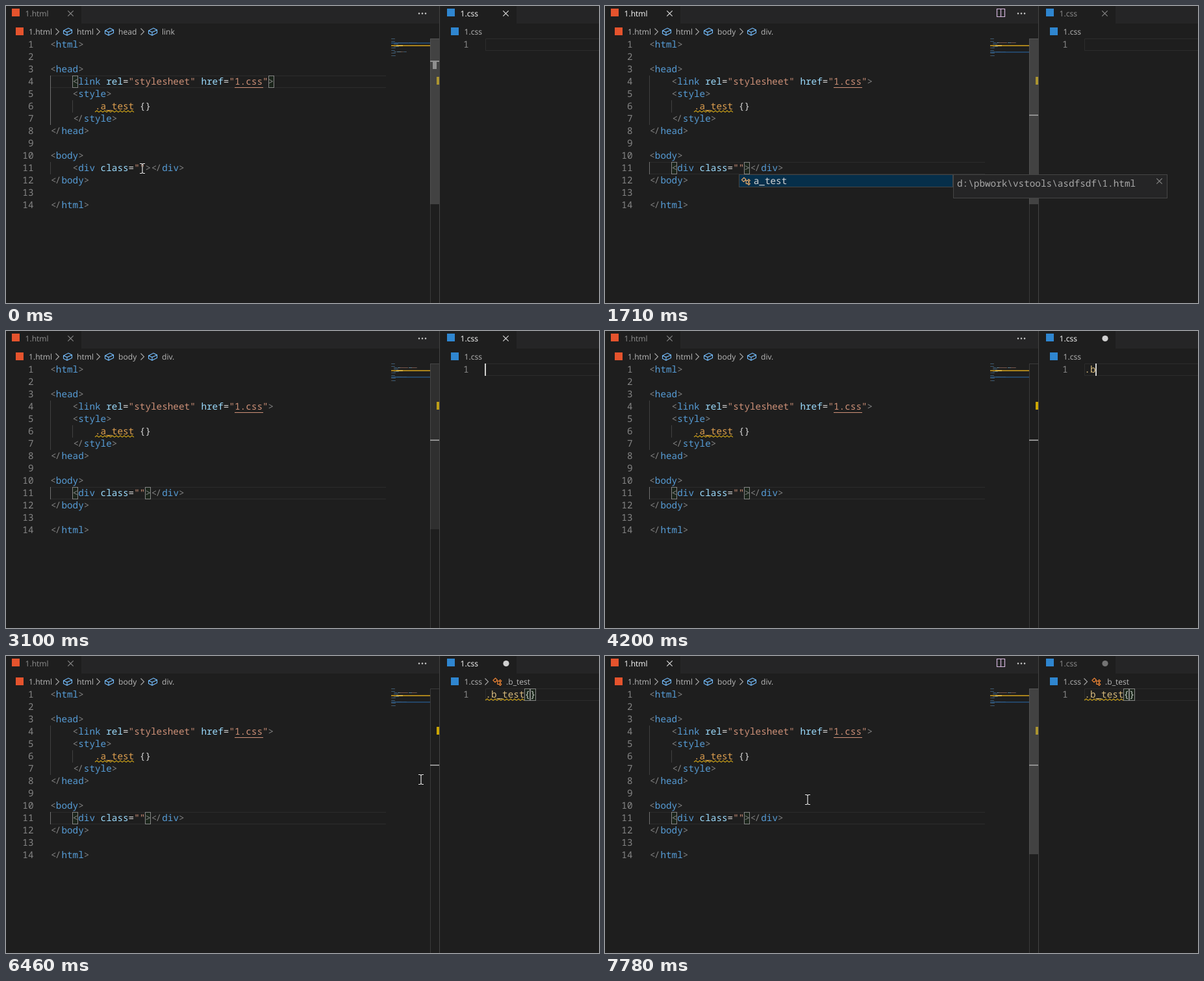
An HTML page that plays this animation: 913 by 457 pixels, repeating every 8000 ms.

```html
<!DOCTYPE html>
<html lang="en">
<head>
<meta charset="utf-8">
<title>Editor demo</title>
<style>
html, body { margin: 0; width: 100%; height: 100%; overflow: hidden; background: #1e1e1e; }
svg { display: block; width: 913px; height: 457px; }
text { text-rendering: geometricPrecision; white-space: pre; }
.code { font: 500 14.33px "Noto Sans Mono", "DejaVu Sans Mono", monospace; }
.ui { font: 12.1px "Open Sans", "Noto Sans", sans-serif; fill: #b8b8b8; }
.bar { fill: #252526; }
.num { fill: #858585; text-anchor: end; }
.line { fill: none; stroke: #2c2c2c; }
.match { fill: rgba(0, 100, 0, .1); stroke: #858585; }
.guide { fill: #404040; }
.active { fill: #707070; }
.caret { fill: #d0d0ce; }
.wave { fill: none; stroke: #d0a416; stroke-width: 1.1; }
.chev { fill: none; stroke: #a9a9a9; stroke-width: 1.1; }
.cube { fill: none; stroke: #75beff; stroke-width: 1.1; }
.node { fill: none; stroke: #ee8434; stroke-width: 1.2; }
.html { fill: #e5532d; }
.css { fill: #2f86d0; }
.warn { fill: #cca700; }
.ltab, .rtab { fill: #8f8f8f; }
.x { fill: none; stroke: #8a8a8a; stroke-width: 1.1; }
.left .ltab, .right .rtab { fill: #fff; }
.left .lx, .right .rx { stroke: #e0e0e0; }
.left .dot { fill: #747474; }
.right .dot { fill: #d0d0d0; }
</style>
</head>
<body>
<svg id="stage" viewBox="0 0 913 457">
  <defs>
    <path id="cross" d="M-4.2-4.2 4.2 4.2M4.2-4.2-4.2 4.2"/>
    <path id="chev" d="M-2.5-5 2.5 0-2.5 5"/>
    <path id="cube" d="M-6.5-1.6 1-5.5 6.5-2.6V1.9L-1 5.6-6.5 2.9ZM-6.5-1.6-1 .8 6.5-2.6M-1 .8V5.6"/>
    <path id="node" d="M-6.5-1.5-3-5 0-2-3.5 1.5ZM-1.5-.5H2.6M.3-.5V4.5H2.6M2.6-.5 4.4-2.3 6.2-.5 4.4 1.3ZM2.6 4.5 4.4 2.7 6.2 4.5 4.4 6.3Z"/>
    <path id="beam" d="M-4-7.5H-1.5L0-6.5 1.5-7.5H4M0-6.5V6.5M-4 7.5H-1.5L0 6.5 1.5 7.5H4"/>
  </defs>
  <rect width="913" height="457" fill="#1e1e1e"/>

  <!-- tab bars -->
  <rect class="bar" x="116" width="551" height="27"/>
  <rect class="bar" x="786" width="127" height="27"/>
  <rect class="html" x="9" y="4" width="12" height="12"/>
  <text class="ui ltab" x="29.5" y="16">1.html</text>
  <use class="x lx" href="#cross" x="99.5" y="11.5"/>
  <path d="M603.5 4.5H615.5V16.5H603.5ZM609.5 4.5V16.5" fill="none" stroke="#d3b5dc" stroke-width="1.2"
    data-on="150-3100 7230-8000"/>
  <g fill="#cfcfcf">
    <circle cx="636" cy="11.5" r="1.2"/><circle cx="641" cy="11.5" r="1.2"/><circle cx="646" cy="11.5" r="1.2"/>
  </g>
  <rect class="css" x="679" y="4" width="12" height="12"/>
  <text class="ui rtab" x="699.5" y="16">1.css</text>
  <use class="x rx" href="#cross" x="769.5" y="11.5" data-on="0-3970"/>
  <circle class="dot" cx="770" cy="11.5" r="4.6" data-on="3970-8000"/>

  <!-- breadcrumbs -->
  <rect class="html" x="15" y="33" width="12" height="12"/>
  <text class="ui" x="35" y="44">1.html</text>
  <use class="chev" href="#chev" x="79" y="39.5"/>
  <use class="cube" href="#cube" x="95" y="39.5"/>
  <text class="ui" x="109" y="44">html</text>
  <use class="chev" href="#chev" x="142" y="39.5"/>
  <use class="cube" href="#cube" x="159" y="39.5"/>
  <use class="chev" href="#chev" x="210" y="39.5"/>
  <use class="cube" href="#cube" x="226" y="39.5"/>
  <g class="ui" data-on="0-230"><text x="173" y="44">head</text><text x="240" y="44">link</text></g>
  <g class="ui" data-on="230-8000"><text x="173" y="44">body</text><text x="240" y="44">div.</text></g>
  <rect class="css" x="685" y="33" width="12" height="12"/>
  <text class="ui" x="705.5" y="44">1.css</text>
  <g data-on="4580-8000">
    <use class="chev" href="#chev" x="740" y="39.5"/>
    <use class="node" href="#node" x="756.5" y="39"/>
    <text class="ui" x="770" y="44" id="crumb"></text>
  </g>

  <!-- current lines and guides -->
  <rect class="guide" x="68" y="107" width="1" height="76"/>
  <rect class="guide" x="102" y="145" width="1" height="19"/>
  <rect class="guide" x="68" y="240" width="1" height="19"/>
  <g data-on="0-150">
    <path class="line" d="M68 107.5H585M68 125.5H585"/>
    <rect class="guide active" x="68" y="107" width="1" height="76"/>
    <rect class="match" x="102.5" y="107.5" width="8" height="18"/>
    <rect class="match" x="404.5" y="107.5" width="8" height="18"/>
  </g>
  <g data-on="150-8000">
    <path class="line" d="M68 240.5H585M68 258.5H585"/>
    <rect class="guide active" x="68" y="240" width="1" height="19"/>
    <rect class="match" x="102.5" y="240.5" width="8" height="18"/>
    <rect class="match" x="214.5" y="240.5" width="8" height="18"/>
  </g>
  <path class="line" d="M913 50.5H738.5V68.5H913"/>

  <!-- code -->
  <g id="code" class="code"></g>
  <path d="M352 125.5H396" stroke="#ce9178"/>
  <g id="waves"></g>
  <g class="code">
    <text class="num" x="712.5" y="64">1</text>
    <text x="738.3" y="64"><tspan id="rule" fill="#d7ba7d"></tspan><tspan id="braces" fill="#d4d4d4"></tspan></text>
  </g>
  <g data-on="5590-8000">
    <rect class="match" x="798.5" y="50.5" width="8" height="18"/>
    <rect class="match" x="807.5" y="50.5" width="8" height="18"/>
  </g>
  <rect class="caret" x="205" y="240" width="2" height="19"
    data-on="150-690 1160-1710 2180-2650 7230-7780"/>
  <rect class="caret" id="caret" y="50" width="2" height="19"
    data-on="3100-3650 3970-6140 6610-7080"/>

  <!-- minimap and overview ruler -->
  <g id="map" opacity=".5"></g>
  <rect x="593" y="56" width="60" height="2" fill="#264f78" opacity=".8" data-on="0-150"/>
  <rect x="593" y="70" width="60" height="2" fill="#264f78" opacity=".8" data-on="150-8000"/>
  <rect x="593" y="60" width="60" height="2" fill="#a9821c"/>
  <rect x="601" y="60" width="10" height="2" fill="#d6ae3c"/>
  <path d="M653.5 50V457M653 50.5H667" stroke="#3a3a3a"/>
  <rect class="warn" x="663" y="109" width="4" height="12"/>
  <rect id="slider" x="653" y="50" width="14" height="255" fill="#797979" fill-opacity=".4"/>
  <g fill="#8f8f8f">
    <path d="M653 84H667V86H663V97H657V86H653Z" data-on="0-150"/>
    <rect x="653" y="167" width="14" height="2" data-on="150-8000"/>
  </g>
  <path d="M667.5 0V457" stroke="#444"/>

  <!-- suggestion list -->
  <g data-on="1480-3100">
    <rect x="206.5" y="259.5" width="329" height="19" fill="#062f4a" stroke="#454545"/>
    <use class="node" href="#node" x="217" y="269" style="stroke:#e8ab6a"/>
    <text class="code" x="228.7" y="274" fill="#d4d4d4">a_test</text>
    <rect x="536.5" y="259.5" width="329" height="36" fill="#252526" stroke="#454545"/>
    <text class="code" x="542" y="278" fill="#a8a8a8">d:\pbwork\vstools\asdfsdf\1.html</text>
    <use class="x" href="#cross" x="853.5" y="269.5"/>
  </g>

  <g id="mouse" fill="none" data-on="0-1480 6460-8000">
    <use href="#beam" stroke="#111" stroke-width="2.6"/>
    <use href="#beam" stroke="#f0f0f0" stroke-width="1.2"/>
  </g>
</svg>
<script>
const LOOP = 8000, CHAR = 8.6, LINE = 19;
const $ = id => document.getElementById(id);

// Each token starts with its colour key; the number is the indent.
const colors = { g: '#808080', t: '#569cd6', a: '#9cdcfe', s: '#ce9178', c: '#dfa050', w: '#d4d4d4' };
const lines = [
  [0, 'g<~thtml~g>'],
  [0, ''],
  [0, 'g<~thead~g>'],
  [4, 'g<~tlink~w ~arel~w=~s"stylesheet"~w ~ahref~w=~s"1.css"~g>'],
  [4, 'g<~tstyle~g>'],
  [8, 'c.a_test~w {}'],
  [4, 'g</~tstyle~g>'],
  [0, 'g</~thead~g>'],
  [0, ''],
  [0, 'g<~tbody~g>'],
  [4, 'g<~tdiv~w ~aclass~w=~s""~g>~g</~tdiv~g>'],
  [0, 'g</~tbody~g>'],
  [0, ''],
  [0, 'g</~thtml~g>']
];

function add(parent, tag, attrs, text = '') {
  const el = document.createElementNS('http://www.w3.org/2000/svg', tag);
  for (const k in attrs) el.setAttribute(k, attrs[k]);
  el.textContent = text;
  return parent.appendChild(el);
}

lines.forEach(([indent, source], i) => {
  const y = 64 + i * LINE;
  add($('code'), 'text', { class: 'num', x: 42.5, y }, i + 1);
  let col = indent;
  for (const token of source.split('~').filter(Boolean)) {
    const fill = colors[token[0]], text = token.slice(1), x = 68.2 + col * CHAR;
    if (text === '</') { // drawn tight, like a ligature
      add($('code'), 'text', { x: x + 0.8, y, fill }, '<');
      add($('code'), 'text', { x: x + CHAR - 1, y, fill }, '/');
    } else {
      add($('code'), 'text', { x, y, fill }, text);
    }
    if (text.trim()) add($('map'), 'rect', { x: 593 + col, y: 50 + 2 * i, width: text.length, height: 1, fill });
    col += text.length;
  }
});

function wave(x, y, width, on) {
  let d = `M${x} ${y + 2}`;
  for (let i = 1; i <= width / 3; i++) d += `L${x + i * 3} ${y + (i % 2 ? 0 : 2.4)}`;
  add($('waves'), 'path', { class: 'wave', d, 'data-on': on });
}
wave(137, 161, 60, '0-8000');
wave(738, 66, 60, '6140-8000');

const timed = [...document.querySelectorAll('[data-on]')].map(el => ({
  el, spans: el.dataset.on.split(' ').map(s => s.split('-').map(Number))
}));
const within = (spans, t) => spans.some(([a, b]) => t >= a && t < b);

// Times at which each further character has been typed
const keys = [3970, 4130, 4520, 4830, 4890, 5040, 5120];
const braceAt = 5520;
const mousePath = [[0, 210, 250], [150, 210, 250], [460, 424, 286], [1480, 424, 286],
  [6460, 640, 190], [6940, 217, 246], [7000, 217, 246], [7080, 210, 250], [7230, 210, 250], [7530, 312, 221]];
const sliderFade = [[0, 1], [2750, 1], [3420, 0], [6460, 0], [6560, 1]];

function track(points, t) {
  const i = points.findLastIndex(p => p[0] <= t);
  const a = points[i], b = points[i + 1];
  if (!b) return a.slice(1);
  const k = (t - a[0]) / (b[0] - a[0]);
  return a.slice(1).map((v, n) => v + (b[n + 1] - v) * k);
}

function draw(now) {
  const t = now % LOOP;
  for (const { el, spans } of timed) el.style.visibility = within(spans, t) ? 'visible' : 'hidden';
  $('stage').setAttribute('class', within([[150, 3100], [7230, LOOP]], t) ? 'left' : 'right');

  const count = keys.filter(k => k <= t).length, braces = t >= braceAt;
  $('rule').textContent = '.b_test'.slice(0, count);
  $('braces').textContent = braces ? '{}' : '';
  $('caret').setAttribute('x', Math.floor(737.8 + (count + braces) * CHAR));
  $('crumb').textContent = t < 5670 ? '.b' : '.b_test';

  $('slider').setAttribute('opacity', track(sliderFade, t)[0]);
  $('mouse').setAttribute('transform', `translate(${track(mousePath, t).map(Math.round)})`);
}

const start = performance.now();
function tick() {
  draw(performance.now() - start);
  requestAnimationFrame(tick);
}
tick();
</script>
</body>
</html>
```
